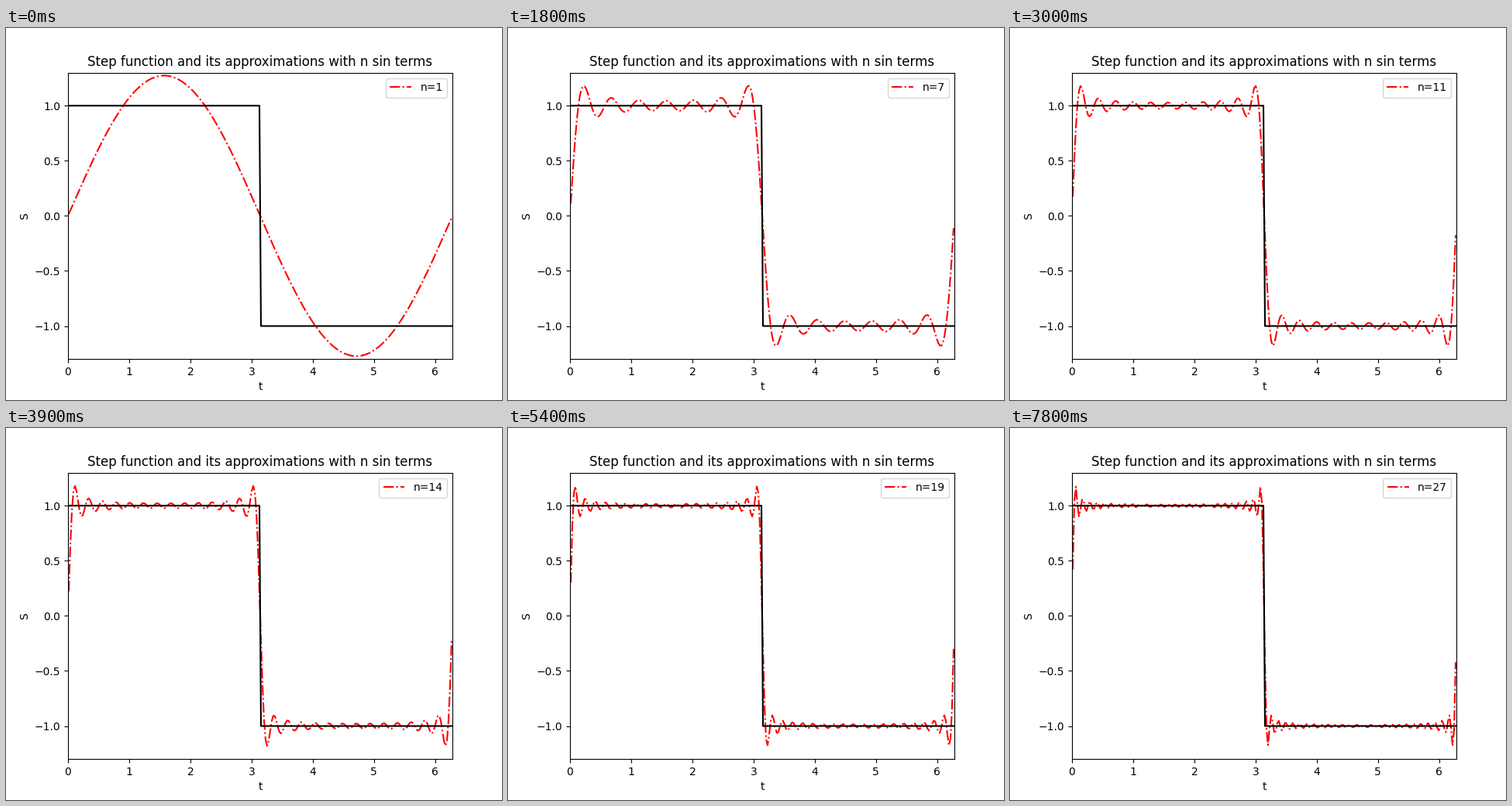
Recreate the animation shown at these times as a matplotlib script. Size 640 px wide and 480 px high, loop 8 s.

```python
import numpy as np
import matplotlib.pyplot as plt
from matplotlib.animation import FuncAnimation

INTERVAL = 100         # ms per frame
FRAMES = 80
FRAMES_PER_TERM = 3    # a new sine term every 300 ms
SAMPLES = 250

# Cell midpoints, so the jump at pi falls between two samples
t = (np.arange(SAMPLES) + 0.5) * 2 * np.pi / SAMPLES


def partial_sum(n):
    """Fourier series of the square wave, cut off after n sine terms."""
    odd = 2 * np.arange(n)[:, None] + 1
    return 4 / np.pi * (np.sin(odd * t) / odd).sum(axis=0)


plt.rcParams["font.family"] = "DejaVu Sans"
fig, ax = plt.subplots(figsize=(6.4, 4.8), dpi=100)
approx, = ax.plot(t, partial_sum(1), "r-.", label="n=1")
ax.plot(t, np.where(t < np.pi, 1, -1), "k-")
ax.set(xlim=(0, 2 * np.pi), ylim=(-1.3, 1.3), xlabel="t", ylabel="S",
       title="Step function and its approximations with n sin terms")
label = ax.legend(loc="upper right").get_texts()[0]


def update(frame):
    n = 1 + frame // FRAMES_PER_TERM
    approx.set_ydata(partial_sum(n))
    label.set_text(f"n={n}")
    return approx, label


anim = FuncAnimation(fig, update, frames=FRAMES, interval=INTERVAL,
                     repeat=True, repeat_delay=0)
plt.show()
```
